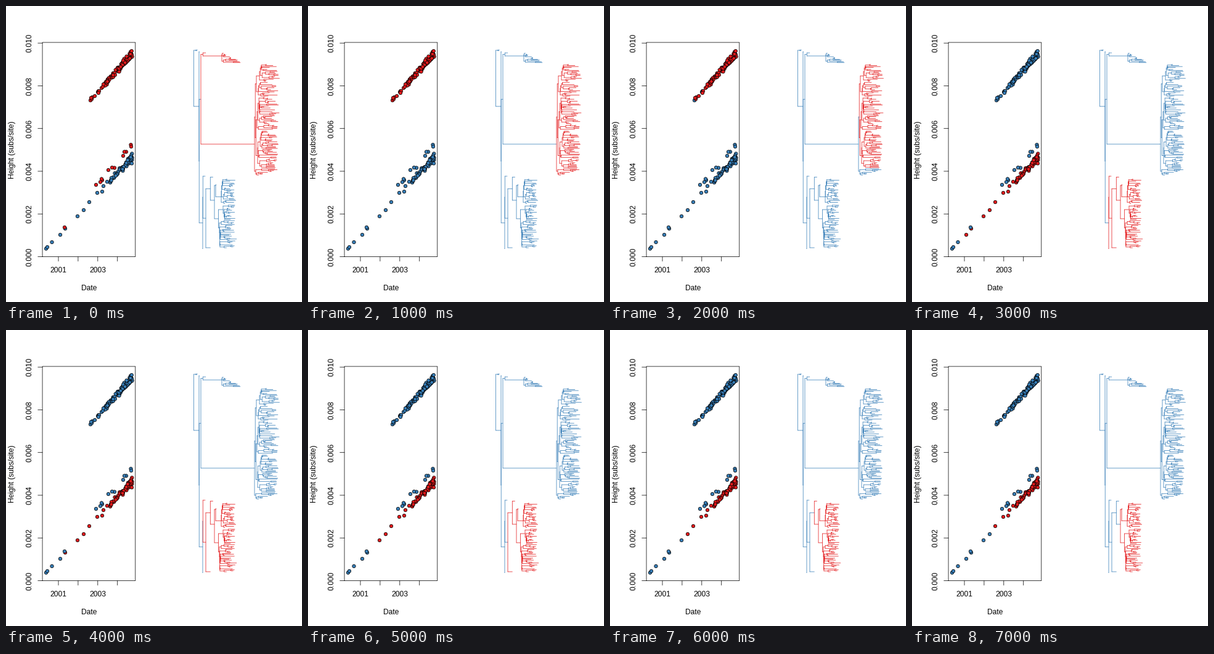
Write a matplotlib script that moves like this. It is 480 by 480 pixels and loops after 8000 ms.

```python
import numpy as np
import matplotlib
import matplotlib.pyplot as plt
from matplotlib.animation import FuncAnimation
from matplotlib.collections import LineCollection

matplotlib.rcParams["font.family"] = "Liberation Sans"

RED, BLUE = "#E41A1C", "#377EB8"
LW = 0.75
rng = np.random.default_rng(4)


class Node:
    def __init__(self, x, kids=(), y=None, point=None):
        self.x, self.kids, self.point = x, list(kids), point
        self.y = np.mean([k.y for k in self.kids]) if y is None else y

    def walk(self):
        yield self
        for kid in self.kids:
            yield from kid.walk()

    def segments(self):
        if not self.kids:
            return []
        ys = [k.y for k in self.kids] + [self.y]
        bars = [[(self.x, k.y), (k.x, k.y)] for k in self.kids]
        return [[(self.x, min(ys)), (self.x, max(ys))]] + bars


def tip(y, point):
    """A leaf whose depth in the tree follows its height in the scatter."""
    return Node(304 + (406.4 - point[1]) * 0.4185, y=y, point=point)


def tips(y0, y1, points):
    return [tip(y, p) for y, p in zip(np.linspace(y0, y1, len(points)), points)]


def grow(leaves, x):
    """Split a run of leaves at random into a binary clade rooted near x."""
    n = len(leaves)
    if n == 1:
        return leaves[0]
    x = min(x, min(t.x for t in leaves) - 0.3)
    cut = int(np.clip(round(n * rng.uniform(0.15, 0.85)), 1, n - 1))
    kids = []
    for part in (leaves[:cut], leaves[cut:]):
        room = min(t.x for t in part) - x
        low, high = (0.3, 0.9) if len(part) < 5 else (0.1, 0.55)
        kids.append(grow(part, x + room * rng.uniform(low, high)))
    return Node(x, kids)


def sample(n, early, span, start, slope, top):
    """Early samples plus random later ones along a clock line."""
    points = list(early)
    while len(points) < n:
        d = 204.5 - span * rng.random() ** 1.6
        sd = 1.0 + 2.4 * max(0, d - 150) / 54
        h = start[1] - (d - start[0]) * slope + rng.normal(0, sd)
        points.append((d, max(h, top + 4 * rng.random())))
    order = rng.permutation(n)
    return [points[i] for i in order]


def high(y0, y1, x, early):
    pts = sample(int((y1 - y0) / 1.5), early, 44, (137, 152), 1.1, 71.5)
    return grow(tips(y0, y1, pts), x)


def low(y0, y1, x, early=()):
    pts = sample(int((y1 - y0) / 1.5), early, 36, (126, 331), 1.08, 237)
    return grow(tips(y0, y1, pts), x)


# Upper clade
upper = Node(404.2, [
    Node(406, [high(95, 122, 411, [(150, 141), (158, 127)]),
               high(124, 146, 409, [(144, 146), (157, 131)])]),
    Node(405.3, [high(148, 200, 407, [(138, 149), (140, 148), (155, 133)]),
                 high(203, 262, 408, [(139, 151), (151, 138), (162, 123)])]),
], y=180)
side = grow(tips(264, 274, [(195, 91), (200, 82), (190, 95), (180, 104),
                            (165, 119), (150, 138), (149, 139.5),
                            (137, 153)]), 405)
side.y = 268
big = Node(403, [upper, side], y=224)
small = grow(tips(76.8, 91.8, [(146, 290), (153, 285.5), (155, 280.5),
                               (156, 282.5), (166, 266), (172, 262),
                               (176, 262.5), (190, 243), (192, 236.5),
                               (195, 236.5), (203, 228), (202.5, 225)]), 350)
small.y = 81
pair = Node(319.3, [tip(76, (95, 359)), small])
mixed = Node(316, [pair, big])

# Lower clade, nested from the inside out
core = Node(338, [
    Node(340, [tip(290, (135, 318)),
               low(281, 320, 349, [(158, 292), (164, 285)])], y=291),
    Node(344.5, [low(323, 346, 352, [(170, 284)]),
                 low(348, 392, 346, [(148, 303), (156, 301)])]),
], y=315)
ring1 = Node(331.3, [tip(277.5, (126, 331)), core])
ring2 = Node(324, [ring1, tip(392, (116, 341))])
ring3 = Node(319.3, [tip(276, (96, 361)), ring2])
ring4 = Node(319, [ring3, tip(393.5, (88, 371))])

stem = Node(313.2, [mixed, ring4])
outer = Node(313, [tip(74.2, (74.5, 383)), stem])
first = Node(308, [tip(71.2, (67, 391)), tip(72.6, (65, 393.5))])
root = Node(304.5, [first, outer])

STEPS = [mixed, big, upper, ring4, ring3, ring2, ring1, core]

nodes = list(root.walk())
edges = [(n, s) for n in nodes for s in n.segments()]
leaves = sorted((n for n in nodes if n.point), key=lambda n: -n.y)

fig = plt.figure(figsize=(480 / 72, 480 / 72), dpi=72, facecolor="white")
ax = fig.add_axes([0, 0, 1, 1])
ax.set(xlim=(0, 480), ylim=(480, 0))
ax.axis("off")


def line(xs, ys):
    ax.plot(xs, ys, color="black", lw=LW, snap=False, zorder=1)


def label(x, y, text, angle=0):
    ax.text(x, y, text, fontsize=12, ha="center", va="baseline",
            rotation=angle, rotation_mode="anchor")


# Frame, ticks and labels
L, R, T, B = 59.04, 209.76, 59.04, 406.56
line([L, R, R, L, L], [B, B, T, T, B])
for i in range(4):
    x = 85 + 31.9 * i
    line([x, x], [B, B + 7.2])
    if i % 2 == 0:
        label(x, 432.5, str(2001 + i))
for i in range(6):
    y = 406.5 - 69.27 * i
    line([L - 7.2, L], [y, y])
    label(41.8, y, f"{0.002 * i:.3f}", 90)
label((L + R) / 2, 461.3, "Date")
label(13, (T + B) / 2, "Height (subs/site)", 90)

tree = LineCollection([s for _, s in edges], linewidths=LW,
                      capstyle="round", snap=False)
ax.add_collection(tree)
dots = ax.scatter(*zip(*[n.point for n in leaves]), s=5.4 ** 2,
                  linewidths=LW, edgecolors="black", zorder=3)


def update(i):
    clade = set(STEPS[i].walk())

    def tint(n):
        return RED if n in clade else BLUE

    tree.set_color([tint(n) for n, _ in edges])
    dots.set_facecolor([tint(n) for n in leaves])
    return tree, dots


anim = FuncAnimation(fig, update, frames=len(STEPS), interval=1000,
                     repeat=True, repeat_delay=0, blit=False)
plt.show()
```
